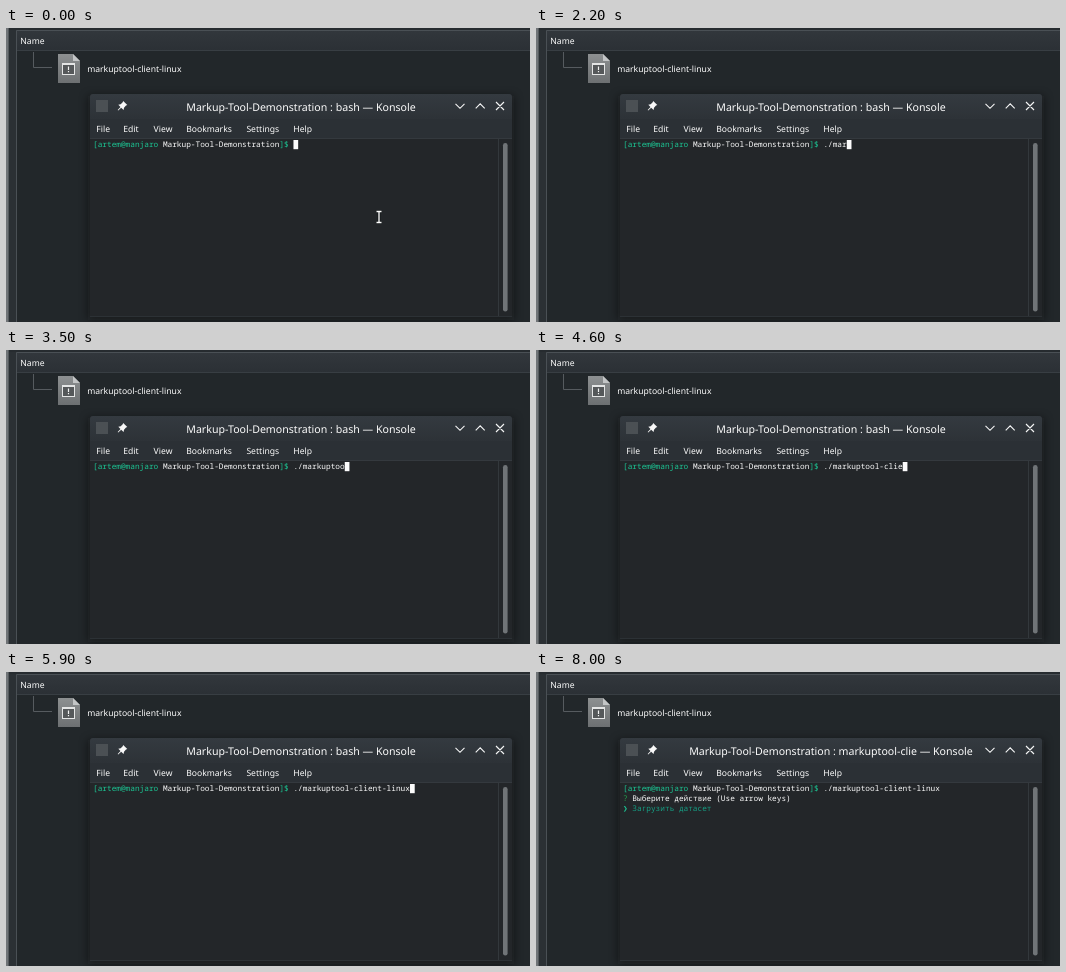
An HTML page that plays this animation: 524x294 px, repeating every 8.2 s.

```html
<!DOCTYPE html>
<html lang="en">
<head>
<meta charset="utf-8">
<title>Terminal demo</title>
<style>
html, body { margin: 0; width: 100%; height: 100%; overflow: hidden; background: #22272a; }
svg { display: block; width: 100%; height: 100%; }
text { white-space: pre; text-rendering: geometricPrecision; fill: #fcfcfc; }
.ui { font: 8.6px "Noto Sans", sans-serif; }
.title { font: 10.62px "Noto Sans", sans-serif; text-anchor: middle; }
.mono { font: 7.77px "Noto Sans Mono", "DejaVu Sans Mono", monospace; }
.mono .g { fill: #1cc795; }
.mono .q { fill: #23a04c; }
.mono .c { fill: #16a085; }
.line { fill: none; stroke: #f4f5f5; stroke-width: 1.1; }
</style>
</head>
<body>
<svg viewBox="0 0 524 294" preserveAspectRatio="none">
  <defs>
    <linearGradient id="head" x2="0" y2="1">
      <stop offset="0" stop-color="#32373c"/><stop offset="1" stop-color="#2b3035"/>
    </linearGradient>
    <linearGradient id="bar" x2="0" y2="1">
      <stop offset="0" stop-color="#343a40"/><stop offset="1" stop-color="#2d3237"/>
    </linearGradient>
    <linearGradient id="paper" x2="0" y2="1">
      <stop offset="0" stop-color="#8d9091"/><stop offset="1" stop-color="#6d7072"/>
    </linearGradient>
    <filter id="soft" x="-10%" y="-10%" width="120%" height="120%">
      <feGaussianBlur stdDeviation="5"/>
    </filter>
  </defs>

  <!-- file manager -->
  <rect width="524" height="294" fill="#22272a"/>
  <rect width="11" height="294" fill="#2b3034"/>
  <rect width="2.6" height="294" fill="#707477"/>
  <rect x="3" width="521" height="2" fill="#262b2f"/>
  <rect x="10" y="2" width="514" height="21" fill="url(#head)"/>
  <path d="M10.5 294V2.5H524" fill="none" stroke="#4a5055"/>
  <path d="M11 22.5H524" stroke="#383e43"/>
  <text class="ui" x="14.3" y="16.2">Name</text>
  <path d="M27.5 24V39.5H46" fill="none" stroke="#565b5f"/>
  <path d="M52 26H67L74 33V55H52Z" fill="url(#paper)"/>
  <path d="M67 26V33H74Z" fill="#c3c5c6"/>
  <rect x="56.5" y="35.5" width="12" height="11" fill="#55585a" stroke="#e4e5e5"/>
  <path d="M56 36H69" stroke="#e4e5e5" stroke-width="2"/>
  <path d="M62.5 38.5V42M62.5 43V44.3" stroke="#f2f2f2" stroke-width="1.2"/>
  <text class="ui" x="81.2" y="43.6">markuptool-client-linux</text>

  <!-- build log showing above the window -->
  <g id="log">
    <rect x="3" width="521" height="8.5" fill="#232627"/>
    <text class="mono" x="1" y="8">k useEffect has missing dependencies: 'props.markupId' and 'startFetchingNextMarkupItem'. Either include them</text>
    <rect x="10" y="8.6" width="514" height="3" fill="#30353a"/>
  </g>

  <!-- terminal window -->
  <rect x="82" y="68" width="426" height="224" fill="#0d0f10" opacity=".5" filter="url(#soft)"/>
  <path d="M84 289V69Q84 66 87 66H503Q506 66 506 69V289Z" fill="#232629"/>
  <path d="M84 91V69Q84 66 87 66H503Q506 66 506 69V91Z" fill="url(#bar)"/>
  <rect x="84" y="91" width="422" height="20" fill="#2b3035"/>
  <path d="M84 110.5H506" stroke="#34393e"/>
  <path d="M492.5 111V289" stroke="#33383c"/>
  <path d="M84 288.5H506" stroke="#2c3135"/>
  <rect x="497" y="115" width="4.6" height="168.5" rx="2.3" fill="#707477"/>
  <rect x="90" y="72" width="12" height="12" fill="#4b5054"/>
  <path d="M117.2 73L121.3 77L120 77.6L118 79.7L117.6 82L115.2 79.7L112.2 82.6L111.7 82.1L114.5 79L112.3 76.8L114.7 76.3L116.7 74.2Z" fill="#f8f8f8"/>
  <path class="line" d="M449.5 75.8L454 80.3L458.5 75.8M469.7 80.3L474.2 75.8L478.7 80.3M490 74L498 82M498 74L490 82"/>
  <text class="title" id="title" x="295" y="82.6"></text>
  <g class="ui" id="menu"></g>
  <g class="mono">
    <text x="87" y="119.2"><tspan class="g">[artem@manjaro</tspan> Markup-Tool-Demonstration<tspan class="g">]$</tspan> <tspan id="cmd"></tspan></text>
    <g id="answer">
      <text x="87" y="129.2"><tspan class="q">?</tspan> Выберите действие (Use arrow keys)</text>
      <text class="c" x="87" y="139.2"><tspan class="g">❯</tspan><tspan class="c" x="96.3">Загрузить датасет</tspan></text>
    </g>
  </g>
  <rect id="caret" width="4.7" height="9.2" fill="#fcfcfc"/>
  <g id="mouse" fill="none">
    <path d="M-2.5 -5.5H2.5M0 -5.5V5.5M-2.5 5.5H2.5" stroke="#15181a" stroke-width="3"/>
    <path d="M-2.5 -5.5H2.5M0 -5.5V5.5M-2.5 5.5H2.5" stroke="#fff" stroke-width="1.3"/>
  </g>
</svg>
<script>
const LOOP = 8200, ENTER = 6100, REPLY = 6300, RENAME = 6600;
const LEFT = 87, CELL = 4.662, PROMPT = 43;
const COMMAND = './markuptool-client-linux';
// time of each key press
const KEYS = [900, 1000, 1800, 2000, 2200, 2400, 2600, 2700, 3300, 3400, 3500, 3700,
  3900, 4200, 4400, 4500, 4600, 4700, 4800, 5000, 5300, 5500, 5700, 5800, 5900];
// time, x, y of the pointer
const PATH = [[0, 373, 189], [100, 385, 176], [400, 438, 112], [700, 424, 48], [1000, 400, -12]];
const MENU = { File: 90.3, Edit: 117.3, View: 147.6, Bookmarks: 180.2, Settings: 240.4, Help: 287.3 };

const $ = id => document.getElementById(id);
const show = (id, on) => $(id).setAttribute('visibility', on ? 'visible' : 'hidden');

$('menu').innerHTML = Object.entries(MENU)
  .map(([name, x]) => `<text x="${x}" y="103.8">${name}</text>`).join('');

function pointerAt(t) {
  const i = PATH.findIndex(p => p[0] > t);
  const [a, b] = [PATH[i - 1], PATH[i]];
  const k = (t - a[0]) / (b[0] - a[0]);
  return [a[1] + (b[1] - a[1]) * k, a[2] + (b[2] - a[2]) * k];
}

function draw(t) {
  const typed = KEYS.filter(k => k <= t).length;
  $('cmd').textContent = COMMAND.slice(0, typed);

  const entered = t >= ENTER;
  $('caret').setAttribute('x', LEFT + (entered ? 0 : (PROMPT + typed) * CELL));
  $('caret').setAttribute('y', entered ? 122 : 112);
  show('caret', t < REPLY);
  show('answer', t >= REPLY);

  const job = t < RENAME ? 'bash' : 'markuptool-clie';
  $('title').textContent = `Markup-Tool-Demonstration : ${job} — Konsole`;
  show('log', t >= 2900 && t < 3000);

  const moving = t < 1000;
  show('mouse', moving);
  if (moving) {
    // the screen is refreshed ten times a second
    const [x, y] = pointerAt(Math.floor(t / 100) * 100);
    $('mouse').setAttribute('transform', `translate(${x} ${y})`);
  }
}

const start = performance.now();
function tick() {
  draw((performance.now() - start) % LOOP);
  requestAnimationFrame(tick);
}
tick();
</script>
</body>
</html>
```
